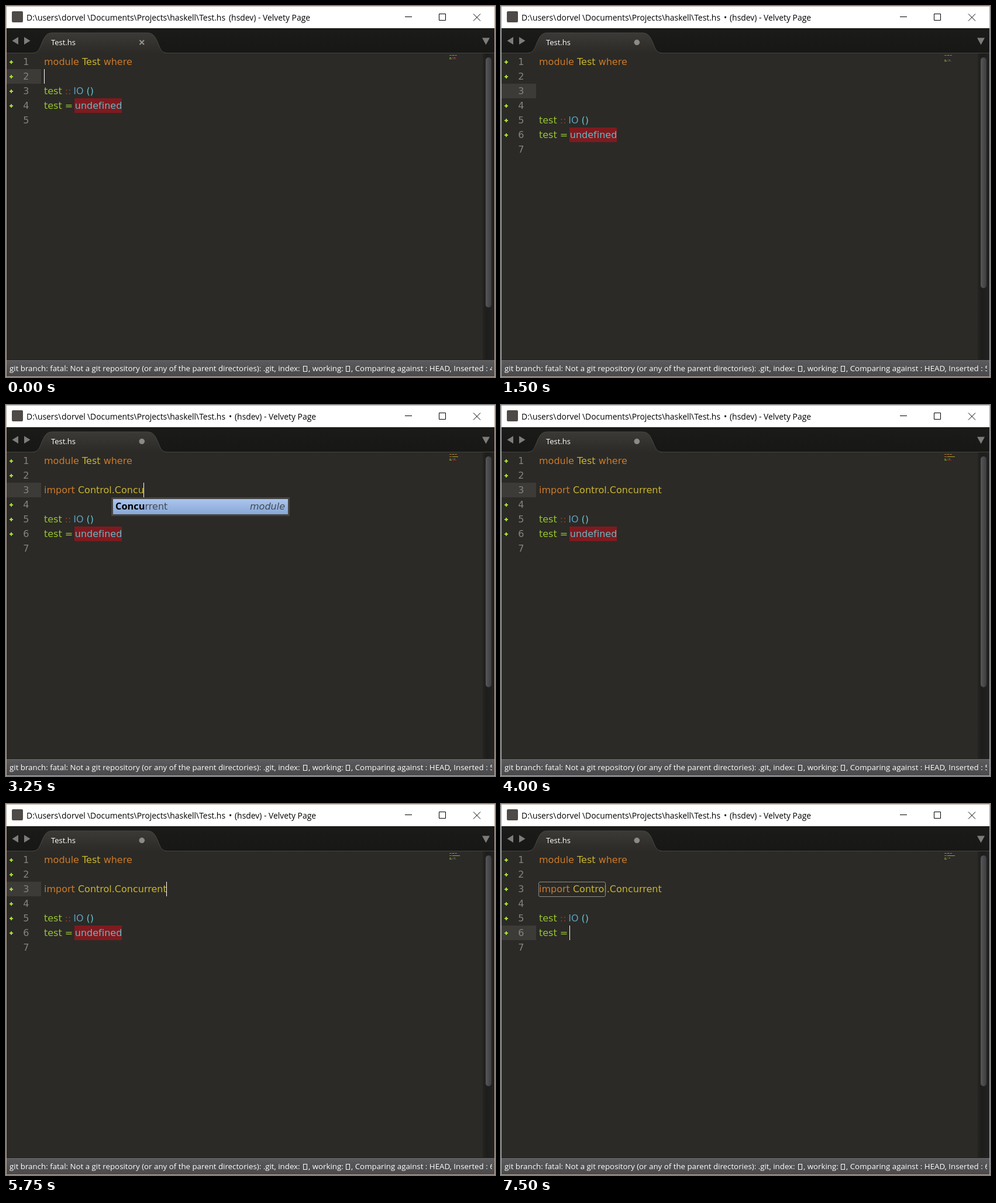
Write an HTML page that moves like this. It is 836 px wide and 635 px high and loops after 8000 ms.

```html
<!DOCTYPE html>
<html lang="en">
<head>
<meta charset="utf-8">
<title>Editor</title>
<style>
html, body { margin: 0; width: 100%; height: 100%; overflow: hidden; }
#stage { position: relative; width: 836px; height: 635px; overflow: hidden; background: #2b2a26; }
#stage div, #stage svg { position: absolute; white-space: pre; }
#stage svg { left: 0; top: 0; }
.ui { font-family: "Open Sans", "Noto Sans", sans-serif; }
#title { left: 0; top: 0; width: 836px; height: 38px; background: #fff; color: #000; font-size: 13.9px; line-height: 21px; }
#title span { position: absolute; top: 9px; }
#stage #tabs { top: 38px; }
#tabName { left: 77px; top: 52px; color: #fff; font-size: 13px; line-height: 20px; }
#code, #popup { font: 16px/25px "DejaVu Sans", sans-serif; font-variant-ligatures: none; }
#code { left: 0; top: 83px; }
.row { left: 0; width: 815px; height: 25px; }
.row.current::before { content: ""; position: absolute; left: 1px; width: 59px; height: 25px; background: #3d3b37; }
.num { right: 775.5px; color: #85847e; }
.mark { left: 6px; top: 12px; width: 6px; height: 2px; background: #a6e22e; }
.mark::after { content: ""; position: absolute; left: 2px; top: -2px; width: 2px; height: 6px; background: #a6e22e; }
.text { left: 65px; }
.key { color: #cc7a29; }
.type { color: #c9b52f; }
.name { color: #97c52f; }
.name.eq { margin-right: -1.5px; }
.op { color: #91402a; margin-right: -1.5px; }
.io { color: #5c9fc0; }
.unit { color: #66c5cf; }
.hole { color: #62bac4; }
.warn { display: inline-block; height: 25px; background: #7f1a1f; box-shadow: -1px 0 #7f1a1f; }
.caret { position: absolute; margin-left: -.5px; width: 1px; height: 25px; background: #fff; }
#frame { left: 64px; top: 133px; width: 113px; height: 24px; border: 1px solid #8d8c87; border-radius: 3px; }
#popup { left: 180px; top: 158px; width: 299px; height: 26px; border: 3px solid #454545; background: linear-gradient(#abc5ec, #88a8d7); color: #45484e; }
#popup b { color: #000; font: bold 16.4px "Noto Sans", "Open Sans", sans-serif; line-height: 24px; }
#popup span, #popup i { position: absolute; top: 0; }
#map div { height: 1.3px; opacity: .85; background: currentColor; }
#map .hole { color: #b02a2a; }
#track { left: 815px; top: 81px; width: 20px; height: 525px; background: linear-gradient(90deg, #252421, #1d1d1c 35%, #222221); }
#thumb { left: 820px; top: 88px; width: 10px; border-radius: 5px; background: linear-gradient(90deg, #57575a, #47474a 60%, #3c3c3e); }
#bar { left: 0; top: 605px; width: 836px; height: 30px; background: linear-gradient(#1d1d1c 1px, #6a6a6c 1px, #5a5a5c 3px, #48484a); }
#status { left: 1px; top: 606px; width: 830px; height: 28px; overflow: hidden; color: #fff; font-size: 13.3px; line-height: 28px; }
#status span { position: absolute; top: 0; }
#status i { position: absolute; top: 10px; width: 5px; height: 8px; border: 1px solid #fff; }
#edge { inset: 0; border: 1px solid #b9a79b; }
</style>
</head>
<body>
<div id="stage">
  <div id="title" class="ui">
    <svg width="836" height="38" fill="none" stroke="#000">
      <rect x="10" y="9" width="19" height="19" rx="2" fill="#4d4a47" stroke="none"/>
      <path d="M682 18.5H694M740.5 13.5H751.5V24.5H740.5ZM799 13.5L811 25.5M811 13.5L799 25.5"/>
    </svg>
    <span style="left:35px">D:\users\</span><span style="left:95px">dorvel</span><span style="left:139px">\Documents\Projects\haskell\Test.hs</span><span id="dirty" style="left:381px">•</span><span id="app">(hsdev) - Velvety Page</span>
  </div>
  <svg id="tabs" width="836" height="45">
    <defs>
      <linearGradient id="barFill" x2="0" y2="1"><stop stop-color="#1b1b1a"/><stop offset="1" stop-color="#171716"/></linearGradient>
      <linearGradient id="tabFill" x2="0" y2="1"><stop stop-color="#3b3a37"/><stop offset="1" stop-color="#2b2a26"/></linearGradient>
    </defs>
    <rect width="836" height="42" fill="url(#barFill)"/>
    <path d="M0 42.5H836" stroke="#454440"/>
    <path d="M46 43C55 42 57 36 61 26C67 12 70 8 80 8H240C251 8 254 12 260 26C264 36 266 42 275 43Z" fill="url(#tabFill)"/>
    <path d="M46 42.5C55 42 57 36 61 26C67 12 70 8 80 8H240C251 8 254 12 260 26C264 36 266 42 275 42.5" fill="none" stroke="#4a4945"/>
    <path d="M21 15V28L10.5 21.5ZM31 15V28L41.5 21.5ZM814 16.5H827L820.5 28.5Z" fill="#7c7c7b"/>
    <path id="close" d="M228.5 20.5L236 28M236 20.5L228.5 28" stroke="#91908c" stroke-width="2.2"/>
    <circle id="dot" cx="232.3" cy="24.3" r="4.8" fill="#8b8a86"/>
  </svg>
  <div id="tabName" class="ui">Test.hs</div>
  <div id="code"></div>
  <div id="frame"></div>
  <div id="popup"><span style="left:4px"><b>Concu</b>rrent</span><i style="right:5px">module</i></div>
  <div id="map"></div>
  <div id="track"></div>
  <div id="thumb"></div>
  <div id="bar"></div>
  <div id="status" class="ui"><span style="left:5px">git branch: fatal: Not a git repository (or any of the parent directories): .git, index:</span><i style="left:507px"></i><span style="left:516px">, working:</span><i style="left:580px"></i><span style="left:589px">, Comparing against : HEAD, Inserted : <span id="count"></span></span></div>
  <div id="edge"></div>
</div>
<script>
const LOOP = 8000;
const $ = id => document.getElementById(id);

// Each step changes the state left by the steps before it.
const steps = [
  [0, { added: 0, row: 2, caret: 1, typed: '', call: 'undefined', count: 4, marked: 0, popup: 0, frame: 0 }],
  [250, { added: 1, row: 3 }],
  [500, { added: 2, row: 4, count: 5 }],
  [1000, { row: 3 }],
  [1500, { caret: 0 }],
  [1750, { caret: 1, typed: 'imp' }],
  [2000, { typed: 'import ' }],
  [2250, { typed: 'import C' }],
  [2750, { typed: 'import Contr' }],
  [3000, { typed: 'import Control.C' }],
  [3250, { typed: 'import Control.Concu', popup: 1 }],
  [3500, { typed: 'import Control.Concurrent', popup: 0 }],
  [4000, { caret: 0 }],
  [4250, { count: 6, marked: 1 }],
  [4500, { caret: 1 }],
  [5000, { caret: 0 }],
  [5500, { caret: 1 }],
  [6000, { row: 5 }],
  [6250, { row: 6 }],
  [6500, { call: 'undefin' }],
  [6750, { call: 'un' }],
  [7000, { call: '' }],
  [7250, { frame: 1 }]
];
const states = [];
steps.forEach(([, change], i) => states.push({ ...states[i - 1], ...change }));

function linesOf(s) {
  const lines = [
    { marked: 1, tokens: [['key', 'module '], ['type', 'Test '], ['key', 'where']] },
    { marked: 1, tokens: [] }
  ];
  if (s.added > 0) {
    lines.push({ marked: s.marked, tokens: [['key', s.typed.slice(0, 7)], ['type', s.typed.slice(7)]] });
  }
  if (s.added > 1) lines.push({ marked: 1, tokens: [] });
  lines.push(
    { marked: 1, tokens: [['name', 'test '], ['op', ':: '], ['io', 'IO '], ['unit', '()']] },
    { marked: 1, tokens: [['name eq', 'test = '], [s.call === 'undefined' ? 'hole warn' : 'hole', s.call]] },
    { marked: 0, tokens: [] }
  );
  return lines;
}

function rowHtml({ marked, tokens }, i, s) {
  const current = i + 1 === s.row;
  const text = tokens.map(([cls, str]) => `<span class="${cls}">${str}</span>`).join('');
  const caret = current && s.caret ? '<span class="caret"></span>' : '';
  return `<div class="row${current ? ' current' : ''}" style="top:${i * 25}px">` +
    (marked ? '<div class="mark"></div>' : '') +
    `<div class="num">${i + 1}</div><div class="text">${text}${caret}</div></div>`;
}

function mapHtml({ tokens }, i) {
  let col = 0;
  return tokens.map(([cls, str]) => {
    const left = 758 + col * 0.74;
    col += str.length;
    return `<div class="${cls.split(' ')[0]}" style="left:${left}px;top:${83.5 + i * 2}px;width:${str.trim().length * 0.74}px"></div>`;
  }).join('');
}

function show(s) {
  const lines = linesOf(s);
  const dirty = s.added > 0;
  const toggle = (id, on) => { $(id).style.display = on ? '' : 'none'; };
  $('code').innerHTML = lines.map((line, i) => rowHtml(line, i, s)).join('');
  $('map').innerHTML = lines.map(mapHtml).join('');
  $('app').style.left = (dirty ? 391 : 381) + 'px';
  $('thumb').style.height = [428, 411, 395][s.added] + 'px';
  $('count').textContent = s.count;
  toggle('dirty', dirty);
  toggle('dot', dirty);
  toggle('close', !dirty);
  toggle('popup', s.popup);
  toggle('frame', s.frame);
}

let shown = -1;
function tick() {
  const t = performance.now() % LOOP;
  const index = steps.filter(([start]) => start <= t).length - 1;
  if (index !== shown) show(states[shown = index]);
  requestAnimationFrame(tick);
}
tick();
</script>
</body>
</html>
```
